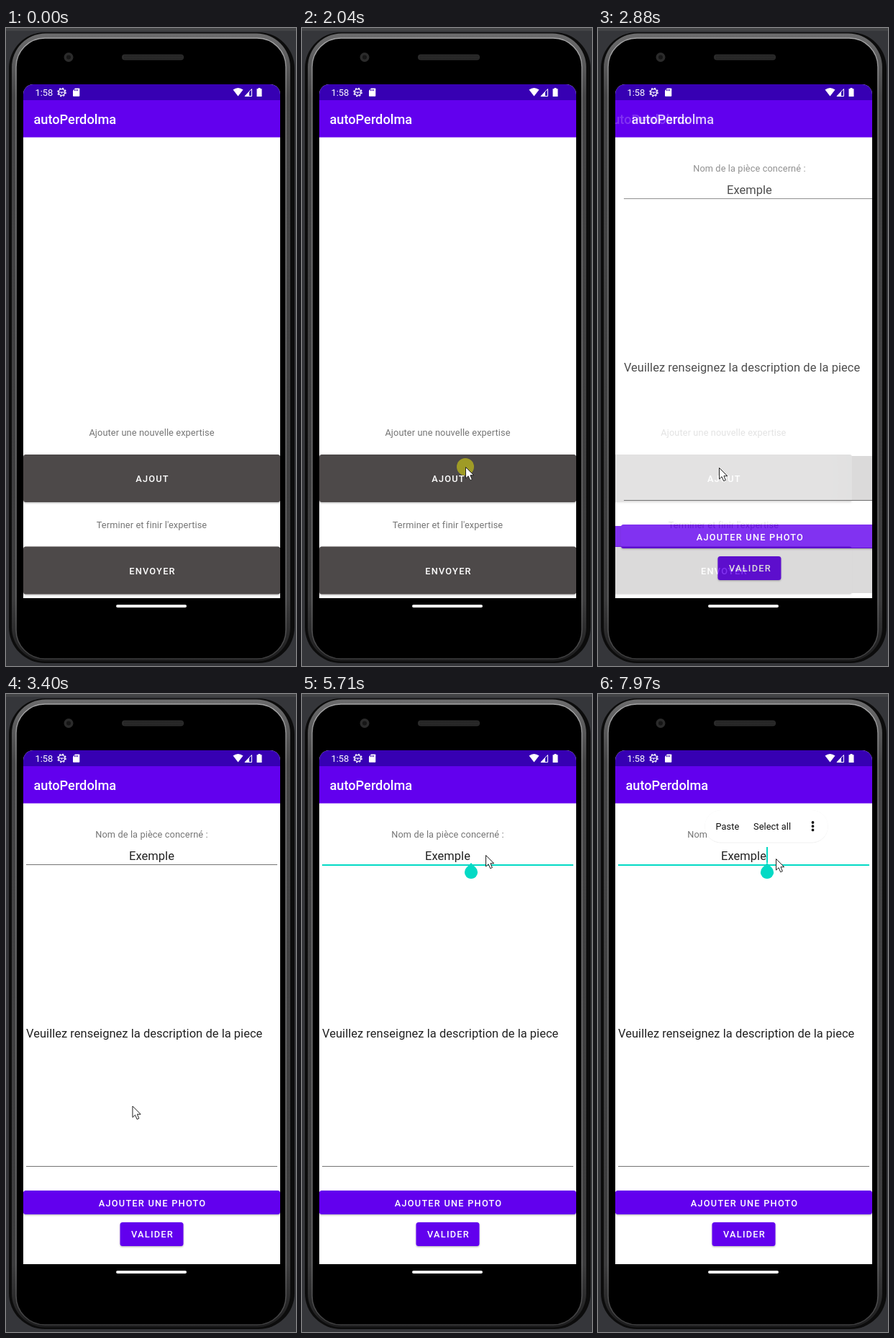
Write an HTML page that moves like this. It is 403 px wide and 884 px high and loops after 8 s.

```html
<!DOCTYPE html>
<html lang="fr">
<head>
<meta charset="utf-8">
<style>
  html, body { margin: 0; height: 100%; overflow: hidden; background: #35363a; }
  svg { display: block; width: 403px; height: 884px; font-family: Roboto, sans-serif; }
  .label { font-size: 12.73px; letter-spacing: .13px; fill: #757575; text-anchor: middle; }
  .button { font-size: 12.73px; font-weight: 500; letter-spacing: 1.26px; fill: #fff; text-anchor: middle; }
  .input { font-size: 16.45px; letter-spacing: .06px; fill: #212121; }
  .title { font-size: 18.2px; font-weight: 500; fill: #fff; }
  .menu { font-size: 12.73px; letter-spacing: .1px; fill: #111; }
  .dark { fill: #4e4949; }
  .purple { fill: #6200ee; }
  .teal { fill: #03dac5; }
</style>
</head>
<body>
<svg viewBox="0 0 403 884">
  <defs>
    <clipPath id="screen"><path d="M24 790V92a14 14 0 0 1 14-14H367a14 14 0 0 1 14 14V790z"/></clipPath>
    <filter id="shadow" x="-10%" y="-20%" width="120%" height="150%">
      <feDropShadow dx="0" dy="1.2" stdDeviation=".8" flood-opacity=".28"/>
    </filter>
    <filter id="lift" x="-10%" y="-20%" width="120%" height="150%">
      <feDropShadow id="liftShadow" dx="0" dy="1.2" stdDeviation=".8" flood-opacity=".28"/>
    </filter>
    <filter id="halo" x="-10%" y="-20%" width="120%" height="150%">
      <feDropShadow dx="0" dy=".3" stdDeviation=".7" flood-opacity=".2"/>
    </filter>
    <linearGradient id="band" x2="0" y2="1">
      <stop offset="0" stop-color="#6c6c6d"/><stop offset=".1" stop-color="#454546"/>
      <stop offset=".9" stop-color="#3c3c3d"/><stop offset="1" stop-color="#1c1c1d"/>
    </linearGradient>
    <linearGradient id="edge" x2="0" y2="1">
      <stop offset="0" stop-color="#a5a5a6"/><stop offset=".1" stop-color="#7c7c7d"/>
      <stop offset=".9" stop-color="#6c6c6d"/><stop offset="1" stop-color="#3c3c3d"/>
    </linearGradient>
    <radialGradient id="ripple" gradientUnits="userSpaceOnUse" cx="205" cy="624" r="300">
      <stop offset=".48" stop-color="#fff" stop-opacity=".22"/><stop offset="1" stop-color="#fff" stop-opacity="0"/>
    </radialGradient>
  </defs>

  <!-- phone -->
  <rect width="403" height="4" fill="#434446"/>
  <rect x="4" y="6" width="397" height="874" rx="50" fill="#0c0c0c"/>
  <rect x="8" y="7.5" width="387" height="870" rx="47" fill="url(#band)"/>
  <rect x="14" y="14" width="375" height="860" rx="40" fill="#000" stroke="url(#edge)" stroke-width="1.5"/>
  <circle cx="87" cy="40.5" r="6.5" fill="#2b2b2b"/>
  <circle cx="87" cy="40.5" r="3" fill="#161616"/>
  <rect x="161" y="36.5" width="86" height="8" rx="4" fill="#2b2b2b"/>
  <path d="M164 39H245M164 42H245" stroke="#151515" stroke-dasharray="1 1"/>
  <rect x="153" y="799" width="98" height="4" rx="2" fill="#f4f4f4"/>

  <g clip-path="url(#screen)">
    <rect x="24" y="78" width="357" height="712" fill="#fff"/>

    <g id="home">
      <rect class="purple" x="24" y="100" width="400" height="51.5"/>
      <text class="title" x="38.5" y="132.5">autoPerdolma</text>
      <text class="label" x="202.5" y="565">Ajouter une nouvelle expertise</text>
      <rect class="dark" x="378" y="593" width="42" height="62"/>
      <rect class="dark" x="24" y="591" width="357" height="66" rx="3.5" filter="url(#lift)"/>
      <rect id="wave" x="24" y="591" width="357" height="66" rx="3.5" fill="url(#ripple)"/>
      <text class="button" x="203.5" y="629">AJOUT</text>
      <text class="label" x="202.5" y="693">Terminer et finir l'expertise</text>
      <rect class="dark" x="378" y="720" width="42" height="63"/>
      <rect class="dark" x="24" y="718.5" width="357" height="66" rx="3.5" filter="url(#shadow)"/>
      <text class="button" x="203.5" y="756.5">ENVOYER</text>
    </g>

    <g id="form">
      <rect x="-20" y="151" width="450" height="640" fill="#fff"/>
      <rect class="purple" x="-20" y="100" width="450" height="51.5"/>
      <text class="title" x="38.5" y="132.5">autoPerdolma</text>
      <text class="label" x="202.5" y="199">Nom de la pièce concerné :</text>
      <text class="input" x="202.5" y="229.5" text-anchor="middle">Exemple</text>
      <rect id="line" x="28" y="236" width="349" height="1" fill="#757575"/>
      <text class="input" x="28" y="476">Veuillez renseignez la description de la piece</text>
      <rect x="28" y="654" width="349" height="1" fill="#757575"/>
      <rect class="purple" x="-20" y="690" width="48" height="29"/>
      <rect class="purple" x="24" y="688" width="357" height="33" rx="3.5" filter="url(#shadow)"/>
      <text class="button" x="203.5" y="709.5">AJOUTER UNE PHOTO</text>
      <rect class="purple" x="158.5" y="732" width="88" height="33" rx="3.5" filter="url(#shadow)"/>
      <text class="button" x="203.5" y="753">VALIDER</text>
      <rect id="caret" class="teal" y="212" width="2" height="22"/>
      <path id="handle" class="teal" d="M235 234l6.4 6.5a9.1 9.1 0 1 1-12.8 0z"/>
      <g id="popup">
        <rect x="148.5" y="161" width="171" height="44.5" rx="22" fill="#fff" filter="url(#halo)"/>
        <text class="menu" x="163.5" y="188">Paste</text>
        <text class="menu" x="216" y="188">Select all</text>
        <path d="M298.5 178v.01M298.5 183.2v.01M298.5 188.4v.01" stroke="#111" stroke-width="3.8" stroke-linecap="round"/>
      </g>
    </g>

    <!-- status bar -->
    <rect x="24" y="78" width="357" height="22" fill="#3700b3"/>
    <text x="40.5" y="94" font-size="12.9" fill="#fff">1:58</text>
    <g fill="none" stroke="#fff">
      <circle cx="77.5" cy="89" r="4.4" stroke-width="1.4"/>
      <circle cx="77.5" cy="89" r="5.6" stroke-width="1.4" stroke-dasharray="2.2 2.2"/>
      <path d="M74 89h7M77.5 89v2"/>
      <path d="M332 94.5H341.5V84.5z"/>
    </g>
    <g fill="#fff">
      <path d="M96 83.5h5.5q.8 0 .8.8V94q0 .8-.8.8H93.800q-.8 0-.8-.8V87z"/>
      <path d="M315.500 85.500q7-5 14 0L322.500 94.500z"/>
      <path d="M332 94.500H338V88.300z"/>
      <path d="M350.500 83h3v1.200h2V95h-7V84.200h2z"/>
    </g>
    <path d="M95.500 85v2.200M97.500 85v2.200M99.500 85v2.200" stroke="#3700b3"/>
  </g>

  <circle id="tap" r="12" fill="#d7d20f" fill-opacity=".6"/>
  <path id="cursor" d="M.5.5V16L4.100 12.700 6.700 18.700 9.400 17.500 6.900 11.700H11.700z" fill="#fff" stroke="#222"/>
</svg>

<script>
  const el = id => document.getElementById(id);
  const set = (id, attrs) => { for (const k in attrs) el(id).setAttribute(k, attrs[k]); };
  const show = (id, on) => set(id, { visibility: on ? 'visible' : 'hidden' });
  const within = (t, a, b) => t >= a && t < b;

  // Progress 0..1 in n even steps, the first at a and the last at b
  const steps = (t, a, b, n) =>
    t < a ? 0 : Math.min(1, (Math.floor((t - a) / (b - a) * (n - 1) + 1e-6) + 1) / n);
  const smooth = p => p * p * (3 - 2 * p);

  // Cursor moves: start, end, steps, x, y
  const moves = [
    [460, 1010, 8, 275, 805], [1340, 1690, 6, 227, 608], [2520, 2740, 3, 168, 609],
    [3270, 4040, 11, 253, 168], [4100, 4170, 2, 254, 191], [4230, 4430, 4, 255, 223],
    [6290, 6430, 3, 249, 228], [7240, 7440, 3, 247, 228]
  ];
  const taps = [2040, 4630, 6830];

  function render(t) {
    let x = 358, y = 884;
    for (const [a, b, n, toX, toY] of moves) {
      const p = smooth(steps(t, a, b, n));
      x += (toX - x) * p;
      y += (toY - y) * p;
    }
    set('cursor', { transform: `translate(${x} ${y})` });
    show('cursor', t >= 460);
    set('tap', { cx: x, cy: y });
    show('tap', taps.some(a => within(t, a, a + 70)));

    const press = steps(t, 2110, 2320, 4);
    set('ripple', { r: 60 + 240 * press, cx: 227 - 22 * press });
    show('wave', press > 0 && t < 3270);
    set('liftShadow', { dy: 1.2 + 8 * press * (1 - press) });

    // The form slides in over the home screen
    const slide = t < 2810 ? 0 : t < 2880 ? .15 : t < 3270 ? .78 : 1;
    set('home', { transform: `translate(${-36 * slide} 0)` });
    set('form', {
      transform: `translate(${36 - 36 * slide} 0)`,
      opacity: t < 2880 ? 0 : t < 3270 ? .8 : 1
    });

    const focused = t >= 5110;
    set('line', { height: focused ? 2 : 1, fill: focused ? '#03dac5' : '#757575' });
    set('caret', { x: t < 5710 ? 171 : 234 });
    show('caret', within(t, 5110, 5430) || within(t, 7040, 7440) || t >= 7970);
    show('handle', t >= 5710);
    set('popup', { opacity: steps(t, 7240, 7440, 3) });
  }

  function tick() {
    render(performance.now() % 8000);
    requestAnimationFrame(tick);
  }
  tick();
</script>
</body>
</html>
```
